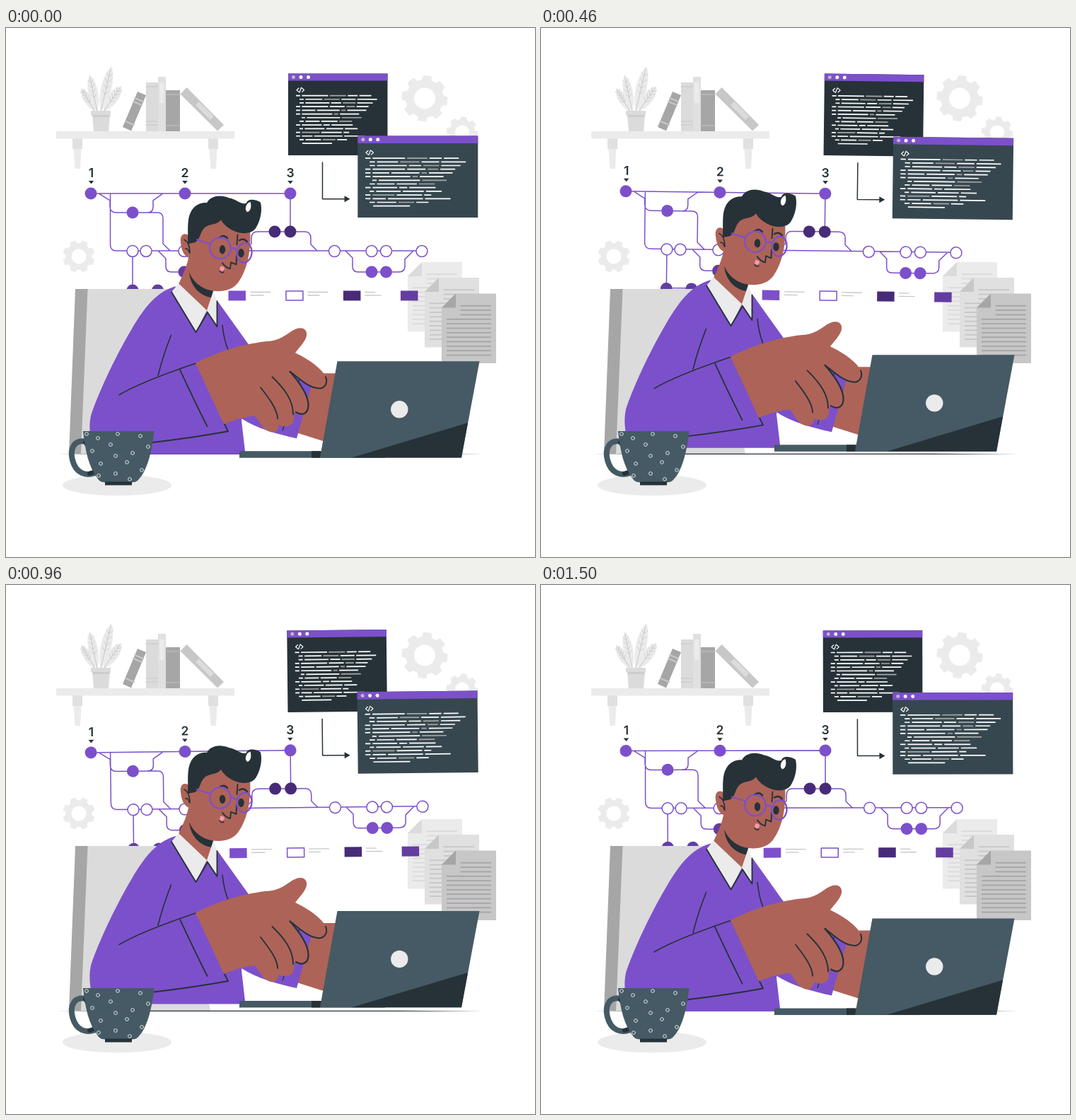
These frames come from a looping animation (748 by 748 pixels, 1.54 s). An HTML page with a canvas:

```html
<!DOCTYPE html>
<html lang="en">
<head>
<meta charset="utf-8">
<title>Developer at work</title>
<style>
html, body { margin: 0; width: 100%; height: 100%; overflow: hidden; background: #fff; }
canvas { display: block; width: 748px; height: 748px; }
</style>
</head>
<body>
<canvas id="stage" width="748" height="748"></canvas>
<script>
const ctx = document.getElementById('stage').getContext('2d');
const LOOP = 1540, STEPS = 37;
const PURPLE = '#7c50ca', PLUM = '#643da0', GRAPE = '#482b78';
const INK = '#263238', SLATE = '#37474f', STEEL = '#455a64', SKIN = '#ae6358';
const G1 = '#ebebeb', G2 = '#e0e0e0', G3 = '#dbdbdb', G4 = '#c7c7c7', G5 = '#a6a6a6';

function fill(d, color) {
  ctx.fillStyle = color;
  ctx.fill(new Path2D(d), 'evenodd');
}

function stroke(d, color, width = 1.5) {
  ctx.strokeStyle = color;
  ctx.lineWidth = width;
  ctx.stroke(new Path2D(d));
}

function rect(x, y, w, h, color) {
  ctx.fillStyle = color;
  ctx.fillRect(x, y, w, h);
}

function oval(x, y, rx, ry, color, line, width = 1.5, turn = 0) {
  ctx.beginPath();
  ctx.ellipse(x, y, rx, ry, turn, 0, Math.PI * 2);
  if (color) { ctx.fillStyle = color; ctx.fill(); }
  if (line) { ctx.strokeStyle = line; ctx.lineWidth = width; ctx.stroke(); }
}

const dot = (x, y, r, color, line, width) => oval(x, y, r, r, color, line, width);

function gear(x, y, r, hole, turn) {
  const teeth = 8, pitch = Math.PI * 2 / teeth;
  ctx.beginPath();
  for (let i = 0; i < teeth; i++) {
    const a = (i + turn) * pitch;
    for (const [k, s] of [[-0.34, 0.8], [-0.22, 0.98], [0.22, 0.98], [0.34, 0.8]])
      ctx.lineTo(x + Math.cos(a + k * pitch) * r * s, y + Math.sin(a + k * pitch) * r * s);
  }
  ctx.closePath();
  ctx.moveTo(x + hole, y);
  ctx.arc(x, y, hole, 0, Math.PI * 2);
  ctx.fillStyle = G1;
  ctx.fill('evenodd');
}

function leaf(x, y, tipX, tipY, width) {
  const len = Math.hypot(tipX - x, tipY - y);
  ctx.save();
  ctx.translate(x, y);
  ctx.rotate(Math.atan2(tipY - y, tipX - x));
  fill(`M0 0C${len * 0.3} ${-width} ${len * 0.75} ${-width} ${len} 0C${len * 0.8} ${width} ${len * 0.3} ${width} 0 0Z`, G1);
  stroke(`M0 0H${len * 0.93}`, G4, 0.9);
  for (let k = 0.38; k < 0.85; k += 0.13) {
    const v = len * k;
    stroke(`M${v + 5} ${-width * 0.45}L${v} 0L${v + 5} ${width * 0.45}`, G4, 0.7);
  }
  ctx.restore();
}

function drawShelf() {
  for (const x of [94, 286]) {
    rect(x, 156, 14, 15, G2);
    fill(`M${x + 1.5} 171h11l-1.5 28h-7.5Z`, G1);
  }
  rect(71, 146, 252, 10.5, G1);

  leaf(129, 118, 118, 66, 9);
  leaf(134, 118, 149, 54, 10);
  leaf(126, 118, 106, 85, 8);
  leaf(138, 118, 163, 82, 10);
  fill('M122 123H147L145 146H124Z', G3);
  rect(120, 117, 28, 6.5, G3);
  rect(122.5, 123.5, 24, 2, G4);

  fill('M186 90L198 95L177 145.500L165 140Z', G5);
  stroke('M182 99L194 104M180 104L192 109M169 132L181 137', G4, 2);
  rect(198, 77, 17, 69, G3);
  stroke('M198 83H215M198 137H215M198 132H215', G4, 1.2);
  rect(215, 69, 11, 77, G2);
  rect(217, 77, 6.5, 29, G1);
  rect(226, 88, 20, 58, G5);
  stroke('M226 94H246M226 138H246', '#bbb', 1.3);
  fill('M255.500 84L308 137L299 145.500L246.500 93.500Z', G4);
  fill('M273 104L294 125L289 130L268 109Z', G3);
}

function page(x, y, paper, lines, fold) {
  fill(`M${x + 20} ${y}H${x + 77}V${y + 98.500}H${x}V${y + 20}Z`, paper);
  fill(`M${x + 20} ${y}V${y + 20}H${x}Z`, fold);
  for (let i = 0; i < 12; i++) {
    const left = i < 3 ? 26.5 : 7;
    rect(x + left, y + 16.3 + i * 6.35, 70 - left, 1.9, lines);
  }
}

// Each row: indent, then dash lengths; negative dashes are grey.
const codeRows = [
  [0, 6, 37, -23, 14, 17], [5, 6, 24, -22, 20, 28], [5, 6, 34, 14, -18, 22], [0, 6, 37, 21, -12, 17],
  [0, 6, 19, 32, -6, 27], [0, 6, 43, -6, 27], [8, 5, 47, -28], [5, 6, 20, 23, -18], [0, 6, 28, 9, 30],
  [5, 5, 28, 24, 18], [0, 6, -25, 29, 8], [0, 6, 15, 40, 29], [5, 6, 22, -18, 14], [9, 42]
];

function editor(x, y, w, h, bar, body, codeX, codeY, stretch) {
  rect(x, y, w, h, body);
  rect(x, y, w, bar, PURPLE);
  [7.5, 18, 28.5].forEach((dx, i) => dot(x + dx, y + bar / 2, 2.5, i ? '#fff' : '#c4b5c5'));
  stroke(`M${codeX + 4} ${codeY - 10.5}l-3 2.700 3 2.700m4.500-5.400l3 2.700-3 2.700m-1-6.200l-2.500 6.800`, '#fff', 1.2);
  codeRows.forEach(([indent, ...dashes], row) => {
    let pos = indent;
    for (const dash of dashes) {
      const len = Math.abs(dash);
      rect(codeX + pos * stretch, codeY + row * 5.2 - 0.8, len * stretch, 1.7, dash < 0 ? G5 : '#fff');
      pos += len + 2.4;
    }
  });
}

function drawGraph() {
  stroke(`M120 234H402V288M131 234L147 244V252Q147 261 156 261H214Q222 261 222 269V305L232 315
    M200 261Q208 261 208 253V244L222 234M147.500 234V306Q147.500 315 156 315H588
    M179 315V370H252M215 315L226 326V337Q226 345 234 345H252
    M336 315L347 305V297Q347 288 356 288H422Q431 288 431 297V306L440 315
    M480 315L490 325V337Q490 345 498 345H555Q564 345 564 337V327L576 315`, PURPLE);
  for (const [x, y] of [[120, 234], [253, 234], [402, 234], [179, 261], [517, 345], [537.5, 345]])
    dot(x, y, 8.5, PURPLE);
  for (const x of [380, 402]) dot(x, 288, 8.5, GRAPE);
  for (const [x, y] of [[179, 371], [214.5, 371], [252, 345]]) dot(x, y, 8.5, PLUM);
  for (const x of [179, 198, 252, 464.5, 517, 537.5, 588]) dot(x, 315.5, 8, '#fff', PURPLE);

  ctx.font = '600 17.5px Inter, "Open Sans", sans-serif';
  ctx.textAlign = 'center';
  [120.5, 253, 402].forEach((x, i) => {
    ctx.fillStyle = INK;
    ctx.fillText(i + 1, x, 211);
    fill(`M${x - 3.8} 216h7.600l-3.800 4.500Z`, INK);
  });

  rect(314.5, 371.5, 24.5, 14, PURPLE);
  ctx.strokeStyle = PURPLE;
  ctx.lineWidth = 1.5;
  ctx.strokeRect(396, 372, 24, 13);
  rect(477, 371.5, 24.5, 14, GRAPE);
  rect(558, 371.5, 24.5, 14, PLUM);
  stroke('M346 373.500H374M346 378H364M427 373.500H455M427 378H443M508 373.500H522M508 378H530', G4, 1.3);
}

function drawBoard(angle) {
  ctx.save();
  ctx.translate(390, 226);
  ctx.rotate(angle);
  ctx.translate(-390, -226);
  editor(399, 64.5, 140.5, 115.5, 10, INK, 410, 95.5, 1);
  editor(497.3, 152.5, 170, 115.5, 10.5, SLATE, 508, 184, 1.24);
  stroke('M447.500 190V241.700H480', INK);
  fill('M478.500 237.200L486.500 241.700L478.500 246.300Z', INK);
  drawGraph();
  ctx.restore();
}

function drawBody() {
  fill('M449 488H468L449 584L411 572L433 497Z', SKIN);
  fill('M333 552C355 566 383 574 411 580L434 498L400 480L335 500Z', PURPLE);
  stroke('M418 487L391 569', INK, 1.3);
  fill(`M240 365C213 372 195 396 178 425C152 469 129 520 120 548C116 566 120 585 124 602.500
    H338.500L333 555L345 450L300 387L270 392Z`, PURPLE);
}

function drawHead() {
  fill('M262 297C254 286 245 291 247 303C248 317 255 327 263 325Z', SKIN);
  fill(`M258 300L305 262L345 284C347 312 342 341 328 360C319 371 306 373 293 371.500L294 381L284 402L243 364
    C250 349 256 337 259 320Z`, SKIN);
  fill('M259 345C264 358 276 369 293 371.500L291.500 381C275 379 261 366 259 345Z', INK);
  fill(`M257 305C258 289 255 270 262 258.500C268 249 277 246 284 247C289 237 303 234.500 315 240C327 242 332 250 340 247.500
    C341 240.500 353 241.500 360 246.500C363 259 359 274 353 283C346 292 333 291 323 287C314 283 308 278 304 271
    C298 279 287 276 281 282C274 288 275 299 267 303Z`, INK);
  fill('M345.500 245.500C338 248 337 258 341.500 260C347 258 347 250 345.500 245.500Z', '#fff');
  stroke('M252 299C258 302 260 309 260 318M254 312Q258 311 259 317', INK, 1.6);

  stroke('M302 296Q308 291 313 297M330 300Q336 296 341 302', INK, 2.4);
  oval(306, 313, 4.2, 6.2, INK);
  oval(332.5, 318, 4.2, 6.2, INK);
  stroke('M327.500 292L326.500 306M326 321L325.500 334L318 331L317 340Q311 339 306 332', INK, 1.9);
  fill('M303 337Q309 336 309 341Q306 345 302 342Z', '#f79aa9');
  stroke('M302 343Q304 347 308 345', INK, 1.5);
  dot(303, 311, 14.8, null, PURPLE, 2.2);
  oval(337, 317.5, 10.5, 14, null, PURPLE, 2.2, 0.12);
  stroke('M318 311Q323 310 327 314M270 299L288.500 305', PURPLE, 2.2);

  fill('M244 361L284 399L268.500 430L234 373Z', G1);
  fill('M284 399L293 372L299 388V422Z', G1);
  stroke('M234 373L268.500 430L285 402L298.500 422V386', INK, 1.9);
}

function drawArm() {
  stroke('M160 518.500Q190 500.500 268 474M233.500 434Q222 463 215 491M306 420Q308 440 314 455', INK, 1.6);
  stroke('M246 483Q263 520 284.500 563', INK, 1.8);
  stroke('M205 586Q265 579 314 570L308 558', INK, 1.9);
  fill(`M268 473.500C300 457 340 445 373 442.500C393 440 399 429 412 424.500C422 422 427 428 424.500 437
    C421 446 414 452 409 459C427 468 446 480 452 493C456 503 449 511 440 509C425 506 412 493 402 485.500
    C416 502 427 518 427.500 532C428 546 418 549 407 544C410 560 400 567 386 561C385 570 379 572 374 571
    C363 568 359 557 352 548C335 550 322 554 308 560Z`, SKIN);
  stroke('M401.500 485.500C413 494 426 507 440 509C449 511 456 503 452 493', INK, 2);
  stroke('M401.500 485.500C416 502 427 518 427.500 532C428 546 418 548 410 543', INK, 2.2);
  stroke('M376.500 493C394 510 406 526 406 546M360 508C371 522 384 539 384 552', INK, 1.9);
}

function drawLaptop() {
  rect(330, 598, 114, 9.5, STEEL);
  rect(432, 598, 104, 9.5, INK);
  fill('M468.500 471H669.500L644 607.300H444Z', STEEL);
  fill('M653 558L489 607.300H644Z', INK);
  dot(556.3, 539, 12.2, G1);
}

const cupDots = [
  [114, 574], [130, 580], [158, 574], [190, 577], [201, 592], [148, 589], [122, 598], [155, 605],
  [179, 601], [134, 616], [171, 614], [192, 625], [131, 633], [155, 630], [175, 638]
];

function drawCup() {
  oval(157, 646.5, 77, 14.8, G1);
  stroke('M116 585.500C96 580 90 595 94 611C99 630 113 634 126 629', STEEL, 8);
  stroke('M112 586L115 590M118 630L126 627', INK, 6);
  fill('M109 570H209.500C206 602 199 627 187 639Q184 642.500 177 642.500H141Q134 642.500 131 639C117 622 112 598 109 570Z', STEEL);
  rect(140, 641.5, 38, 5, INK);
  for (const [x, y] of cupDots) dot(x, y, 2.4, null, '#fff', 0.8);
}

function draw(phase) {
  const lift = 15 * (1 - Math.abs(1 - 2 * phase)) - 0.8;
  const swing = phase < 0.25 ? phase * 4 : phase < 0.75 ? 2 - phase * 4 : phase * 4 - 4;
  const sway = swing - 0.06;

  ctx.lineCap = 'round';
  ctx.lineJoin = 'round';
  rect(0, 0, 748, 748, '#fff');
  drawShelf();
  gear(592, 99.5, 33.5, 15, 0.15);
  gear(645, 147.5, 23, 10, 0.15);
  gear(103, 323, 23.5, 10.5, 0.5);
  page(568, 331, G1, G3, G3);
  page(592, 353, G2, G4, G4);
  page(616, 375.5, G4, G5, G5);
  drawBoard(sway * Math.PI / 180);

  fill('M115 369H244L289 602H100Z', G3);
  fill('M98 369H115.500L106 602H89Z', G5);
  fill('M72 602.400L200 601.700H550L676 602.400L550 603.100H200Z', INK);

  ctx.save();
  ctx.translate(0, -lift);
  drawBody();
  drawHead();
  drawArm();
  drawLaptop();
  ctx.restore();
  drawCup();
}

function tick() {
  const step = Math.floor((performance.now() % LOOP + 4) / LOOP * STEPS) % STEPS;
  draw((step / STEPS + 0.018) % 1);
  requestAnimationFrame(tick);
}
tick();
</script>
</body>
</html>
```
